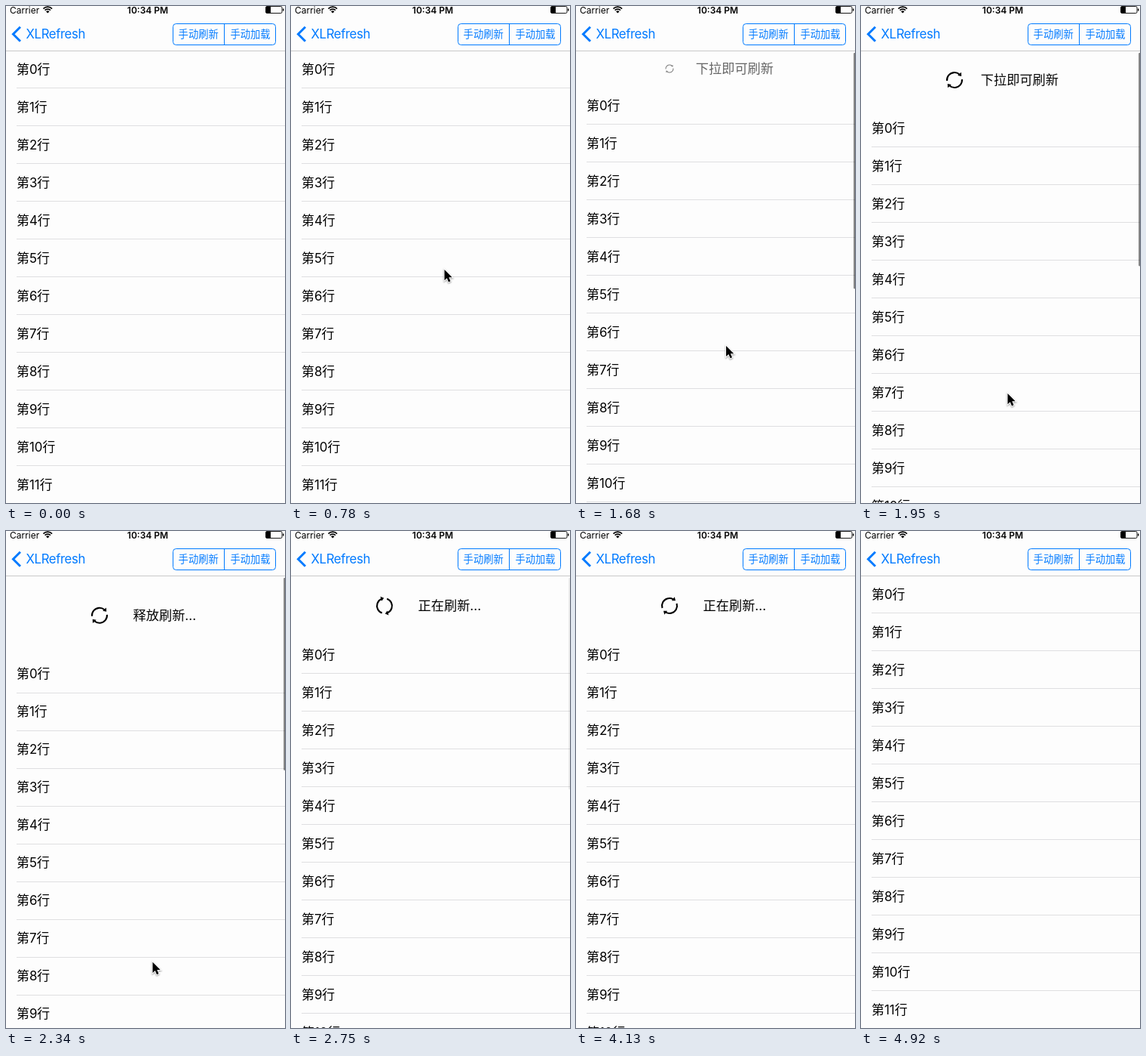
An HTML page with a canvas for the animation above (5490 ms loop, 370 px wide and 658 px high).

```html
<!DOCTYPE html>
<html lang="zh-CN">
<head>
<meta charset="utf-8">
<style>
  html, body { margin: 0; width: 100%; height: 100%; overflow: hidden; background: #fdfdfd; }
  canvas { display: block; }
</style>
</head>
<body>
<canvas width="370" height="658"></canvas>
<script>
const ctx = document.querySelector('canvas').getContext('2d');
const W = 370, H = 658, LOOP = 5490;
const NAV_BOTTOM = 59, ROW_HEIGHT = 50, HEADER_HEIGHT = 80;
const PAPER = '#fdfdfd', BLUE = '#007aff';
const FONTS = 'Inter, "Noto Sans CJK SC", "Noto Sans CJK", sans-serif';
const RELEASE = 2430, CURSOR_IN = 620, CURSOR_OUT = 2500;

const clamp = x => Math.min(1, Math.max(0, x));
const progress = (t, from, to) => clamp((t - from) / (to - from));
const mix = (a, b, p) => a + (b - a) * p;
const easeOut = p => 1 - (1 - p) ** 3;
const easeInOut = p => p * p * (3 - 2 * p);

// Linear interpolation through [time, value] pairs
function along(keys, t) {
  let value = keys[0][1];
  for (let i = 1; i < keys.length; i++) {
    const [from, a] = keys[i - 1], [to, b] = keys[i];
    if (t >= from) value = mix(a, b, progress(t, from, to));
  }
  return value;
}

const PULL = [[1160, 0], [1420, 19], [1950, 78], [2220, 101], [2300, 105.6]];

function pullOffset(t) {
  if (t < RELEASE) return along(PULL, t);
  const settled = mix(105.6, HEADER_HEIGHT, easeOut(progress(t, RELEASE, 2830)));
  return settled * (1 - easeInOut(progress(t, 4590, 4915)));
}

function text(str, x, y, size, { color = '#000', align = 'left', weight = 400, spacing = 0 } = {}) {
  ctx.font = `${weight} ${size}px ${FONTS}`;
  ctx.letterSpacing = spacing + 'px';
  ctx.textAlign = align;
  ctx.fillStyle = color;
  ctx.fillText(str, x, y);
}

function polygon(points) {
  ctx.beginPath();
  points.forEach(([x, y]) => ctx.lineTo(x, y));
}

function strokeArc(x, y, r, from, to) {
  ctx.beginPath();
  ctx.arc(x, y, r, from, to);
  ctx.stroke();
}

function drawStatusBar() {
  text('Carrier', 5, 9.6, 12);
  text('10:34 PM', 188, 9.6, 12, { align: 'center', weight: 600 });

  ctx.strokeStyle = ctx.fillStyle = '#000';
  ctx.lineWidth = 1.7;
  for (const r of [8.2, 5.2]) strokeArc(55.3, 9.4, r, -Math.PI * 0.75, -Math.PI * 0.25);
  ctx.beginPath();
  ctx.moveTo(55.3, 9.6);
  ctx.arc(55.3, 9.6, 3.2, -Math.PI * 0.75, -Math.PI * 0.25);
  ctx.fill();

  ctx.lineWidth = 0.9;
  ctx.beginPath();
  ctx.roundRect(344.5, 0.5, 21.5, 9, 1.5);
  ctx.stroke();
  ctx.fillRect(345, 1, 6, 8);
  ctx.fillRect(367, 3.5, 1.4, 3);
}

function drawNavBar() {
  ctx.fillStyle = PAPER;
  ctx.fillRect(0, 0, W, NAV_BOTTOM);
  ctx.fillStyle = '#c9c9c9';
  ctx.fillRect(0, NAV_BOTTOM, W, 1);
  drawStatusBar();

  ctx.strokeStyle = BLUE;
  ctx.lineWidth = 3;
  polygon([[19, 27.8], [9.5, 37.3], [19, 46.8]]);
  ctx.stroke();
  text('XLRefresh', 26.5, 43, 16.8, { color: BLUE, spacing: -0.4 });

  ctx.lineWidth = 1;
  ctx.beginPath();
  ctx.roundRect(221.5, 23.5, 136, 28, 4);
  ctx.moveTo(289.5, 23.5);
  ctx.lineTo(289.5, 51.5);
  ctx.stroke();
  text('手动刷新', 255.2, 42.2, 13.3, { color: BLUE, align: 'center' });
  text('手动加载', 324, 42.2, 13.3, { color: BLUE, align: 'center' });
}

function drawRows(offset) {
  for (let i = 0; i < 12; i++) {
    const y = offset + i * ROW_HEIGHT;
    text(`第${i}行`, 14, y + 89.6, 16.9);
    ctx.fillStyle = '#dfdfe1';
    ctx.fillRect(14, Math.round(y + 108), W - 14, 1);
  }
}

function drawSpinner(y, scale, angle) {
  ctx.save();
  ctx.translate(124, y);
  ctx.rotate(angle);
  ctx.scale(scale, scale);
  ctx.strokeStyle = ctx.fillStyle = '#000';
  ctx.lineWidth = 2.1;
  for (let half = 0; half < 2; half++) {
    strokeArc(0, 0, 10, -Math.PI * 1.03, -Math.PI * 0.27);
    polygon([[9, -10.2], [9.2, -5], [4.2, -6]]);
    ctx.fill();
    ctx.rotate(Math.PI);
  }
  ctx.restore();
}

function drawHeader(t, offset) {
  if (offset <= 0) return;
  const y = NAV_BOTTOM + offset / 2;
  const label = t >= RELEASE ? '正在刷新...' : offset > HEADER_HEIGHT ? '释放刷新...' : '下拉即可刷新';
  const shown = clamp(offset / HEADER_HEIGHT);
  const spinnerShown = progress(shown, 0.25, 0.95);
  const angle = t >= RELEASE ? (t - 2370) * 0.3 * Math.PI / 180 : 0;

  ctx.globalAlpha = shown;
  text(label, 210.4, y + 6.2, 17.2, { align: 'center' });
  ctx.globalAlpha = spinnerShown;
  drawSpinner(y, spinnerShown, angle);
  ctx.globalAlpha = 1;
}

function drawScrollIndicator(t, offset) {
  if (t < 1190) return;
  const alpha = 0.5 * (1 - progress(t, RELEASE + 60, 2800));
  ctx.fillStyle = `rgba(0, 0, 0, ${alpha})`;
  ctx.beginPath();
  ctx.roundRect(368.2, 62, 2.3, 360 - offset - 62 + 62.5, 1.1);
  ctx.fill();
}

function drawCursor(t, offset) {
  if (t < CURSOR_IN || t >= CURSOR_OUT) return;
  const p = progress(t, CURSOR_IN - 20, 780), q = 1 - p;
  const bezier = (a, b, c) => a * q * q + 2 * b * p * q + c * p * p;
  const x = bezier(352, 215, 203.5) - 9 * progress(t, 1420, 1950);
  const y = bezier(444, 300, 349) + 2.1 * (t < RELEASE ? offset : 105.6);

  ctx.save();
  ctx.translate(x, y);
  polygon([[0, 0], [0, 14.2], [3.3, 11.2], [5.5, 16.4], [8, 15.3], [5.8, 10.3], [10.2, 10.3]]);
  ctx.closePath();
  ctx.shadowColor = 'rgba(0, 0, 0, .4)';
  ctx.shadowBlur = 2;
  ctx.shadowOffsetY = 1;
  ctx.strokeStyle = '#fff';
  ctx.lineWidth = 2;
  ctx.stroke();
  ctx.shadowColor = 'transparent';
  ctx.fillStyle = '#000';
  ctx.fill();
  ctx.restore();
}

function draw(t) {
  const offset = pullOffset(t);
  ctx.fillStyle = PAPER;
  ctx.fillRect(0, 0, W, H);
  drawRows(offset);
  drawHeader(t, offset);
  drawScrollIndicator(t, offset);
  drawNavBar();
  drawCursor(t, offset);
}

const start = performance.now();
function frame() {
  draw((performance.now() - start) % LOOP);
  requestAnimationFrame(frame);
}
frame();
</script>
</body>
</html>
```
